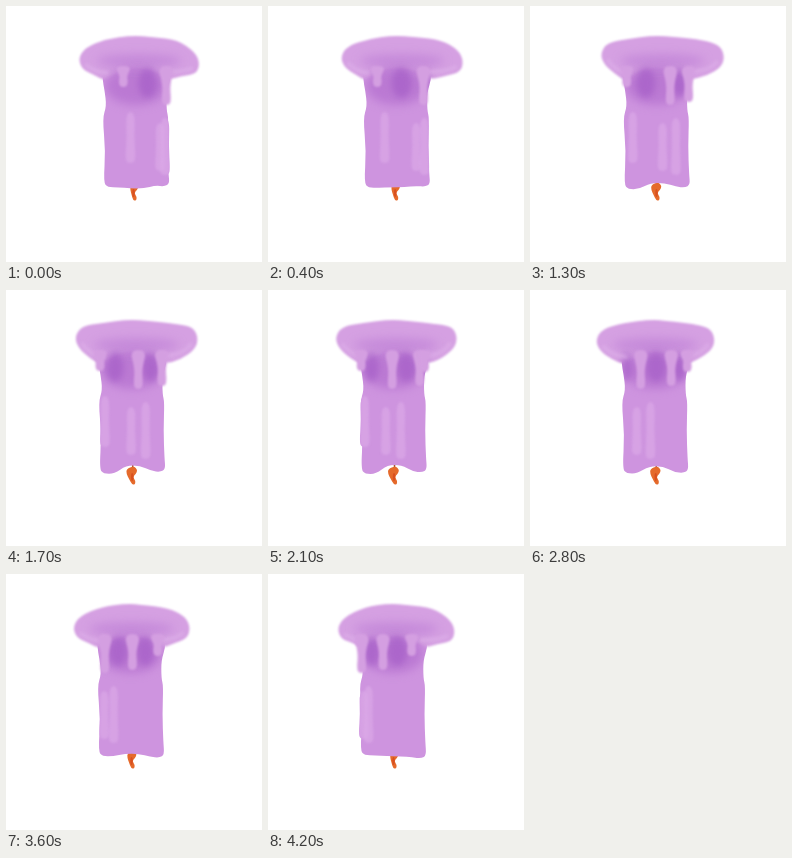
Recreate the animation shown at these times as an HTML page with a canvas. Size 256 px wide and 256 px high, loop 4300 ms.

```html
<!DOCTYPE html>
<html>
<head>
<meta charset="utf-8">
<style>
html, body { margin: 0; width: 100%; height: 100%; overflow: hidden; background: #fff; }
canvas { display: block; width: 256px; height: 256px; }
</style>
</head>
<body>
<canvas id="stage" width="256" height="256"></canvas>
<script>
const ctx = document.getElementById('stage').getContext('2d');
const LOOP = 4300, STEP = 100, TURN = 146;

// Angles in degrees around the candle; the turn carries them to the left.
const DRIPS = [
  { angle: -23, bottom: 80 }, { angle: 69, bottom: 98 },
  { angle: 125, bottom: 95 }, { angle: 178, bottom: 81 }
];
const STREAKS = [
  { angle: -11, top: 106, bottom: 156 },
  { angle: 56, top: 117, bottom: 164 },
  { angle: 86, top: 112, bottom: 168 }
];

// Slow sway that peaks at the given fraction of the loop.
const sway = (u, mid, amp, peak) => mid + amp * Math.cos((u - peak) * 2 * Math.PI / 1.2);

function poseAt(u) {
  const center = 124.8 + 5.2 * (1 - u) ** 3;
  return {
    center,
    left: center - 31.5,
    right: center + 31.5,
    brimL: sway(u, 71, 3.5, 0.07),
    brimR: sway(u, 188, 6, 0.17),
    tipL: sway(u, 51.7, 3.5, 1),
    tipR: sway(u, 52.5, 5, 1.1),
    footL: sway(u, 179.5, 1.5, 0.5),
    footMid: sway(u, 179, 4, 1.1),
    footR: 177.5 + 4 * u,
    flameX: 125 + 2 * (1 - u) ** 2,
    hook: sway(u, 2, 1.5, 0.5)
  };
}

function blob(points, color) {
  const mid = (a, b) => [(a[0] + b[0]) / 2, (a[1] + b[1]) / 2];
  const n = points.length;
  ctx.beginPath();
  ctx.moveTo(...mid(points[n - 1], points[0]));
  points.forEach((p, i) => ctx.quadraticCurveTo(...p, ...mid(p, points[(i + 1) % n])));
  ctx.closePath();
  ctx.fillStyle = color;
  ctx.fill();
}

function oval(x, y, rx, ry, color) {
  ctx.beginPath();
  ctx.ellipse(x, y, rx, ry, 0, 0, 7);
  ctx.fillStyle = color;
  ctx.fill();
}

function brush(blur, mode = 'source-over') {
  ctx.filter = blur ? `blur(${blur}px)` : 'none';
  ctx.globalCompositeOperation = mode;
}

function onSurface(angle, u, center, radius) {
  const a = (angle - TURN * u) * Math.PI / 180;
  return { x: center + radius * Math.sin(a), depth: Math.cos(a) };
}

// A run of wax: wide at the root, narrow in the middle, round at the end.
function waxRun(x, top, bottom, r, root, color) {
  const half = (top + bottom) / 2;
  blob([[x - r * root, top], [x + r * root, top], [x + r * 0.8, half],
    [x + r * 1.1, bottom - 5], [x + r * 0.8, bottom + 1],
    [x - r * 0.8, bottom + 1], [x - r * 1.1, bottom - 5], [x - r * 0.8, half]], color);
}

function drawStreaks(u, center, color) {
  for (const { angle, top, bottom } of STREAKS) {
    const { x, depth } = onSurface(angle, u, center, 29);
    if (depth > -0.2) waxRun(x, top, bottom, 4.7, 1, color);
  }
}

function drawDrips(u, center, color) {
  for (const { angle, bottom } of DRIPS) {
    const { x, depth } = onSurface(angle, u, center, 32.5);
    if (depth > -0.3) waxRun(x, 60, bottom, 4.3, 2, color);
  }
}

function drawBody(p, color) {
  const { left: l, right: r, center: c } = p;
  blob([[l - 2, 58], [r + 3, 58], [r + 3, 74], [r - 1, 86], [r - 1, 104], [r + 1, 112],
    [r, 140], [r + 1, 168], [r + 2, p.footR], [r - 3, p.footR + 3], [r - 12, p.footR + 2],
    [c + 8, p.footMid], [c - 6, p.footMid], [l + 14, p.footL + 3], [l + 3, p.footL + 3],
    [l - 1, p.footL - 2], [l + 1, 145], [l - 2, 112], [l + 2, 100], [l, 84], [l - 2, 74]], color);
}

function drawBrim(p, color) {
  const { brimL: l, brimR: r, tipL, tipR, center: c } = p;
  blob([[l - 2, tipL - 1], [l + 5, tipL - 12], [l + 26, 33], [c - 4, 29.5],
    [r - 45, 31], [r - 20, 34], [r - 3, tipR - 11], [r + 2, tipR],
    [r - 1, tipR + 11], [r - 16, 70], [c + 32, 74], [c + 20, 65], [c, 61],
    [c - 18, 65], [c - 31, 75], [l + 14, 69], [l + 2, tipL + 10]], color);
}

function drawShadow(p, u) {
  brush(5, 'source-atop');
  oval(p.center, 80, 31, 19, 'rgba(176,106,206,0.62)');
  oval((p.brimL + p.brimR) / 2, 55, 42, 7, 'rgba(184,118,211,0.5)');
  brush(3, 'source-atop');
  for (let i = 1; i < DRIPS.length; i++) {
    const between = (DRIPS[i - 1].angle + DRIPS[i].angle) / 2;
    const { x, depth } = onSurface(between, u, p.center, 30);
    if (depth > 0) oval(x, 77, 3 + 7 * depth, 15, 'rgba(158,84,196,0.5)');
  }
}

function drawRim(p) {
  brush(1.5, 'source-atop');
  ctx.strokeStyle = 'rgba(222,176,234,0.6)';
  ctx.lineWidth = 4;
  ctx.beginPath();
  ctx.moveTo(p.brimL + 5, p.tipL + 5);
  ctx.quadraticCurveTo(p.brimL + 14, 66, p.left + 4, 67);
  ctx.moveTo(p.brimR - 5, p.tipR + 5);
  ctx.quadraticCurveTo(p.brimR - 12, 66, p.right - 4, 66);
  ctx.stroke();
}

// The flame hangs behind the wax.
function drawFlame({ flameX: x, hook }) {
  brush(0.4, 'destination-over');
  oval(x + 0.5, 187, 1.2, 4, '#d9501f');
  blob([[x - 2 - hook, 179], [x + 2, 176], [x + 6, 180], [x + 4, 184], [x + 1, 187],
    [x + 4, 191], [x + 3, 195], [x, 194], [x - 1 - hook / 2, 189], [x - 2 - hook, 184]], '#e56a2b');
  oval(x + 1, 176, 0.8, 5, '#a95235');
}

function draw(u) {
  const p = poseAt(u);
  brush(0);
  ctx.clearRect(0, 0, 256, 256);

  brush(0.6);
  drawBody(p, '#ce94df');
  drawStreaks(u, p.center, '#ce94df');
  brush(1.2, 'source-atop');
  drawStreaks(u, p.center, 'rgba(219,169,232,0.65)');

  brush(0.8);
  drawBrim(p, '#d5a0e2');
  drawShadow(p, u);
  drawRim(p);
  brush(0.8);
  drawDrips(u, p.center, '#d49fe1');

  drawFlame(p);
}

const start = performance.now();
function tick() {
  const t = (performance.now() - start) % LOOP;
  draw(Math.floor(t / STEP) * STEP / LOOP);
  requestAnimationFrame(tick);
}
tick();
</script>
</body>
</html>
```
